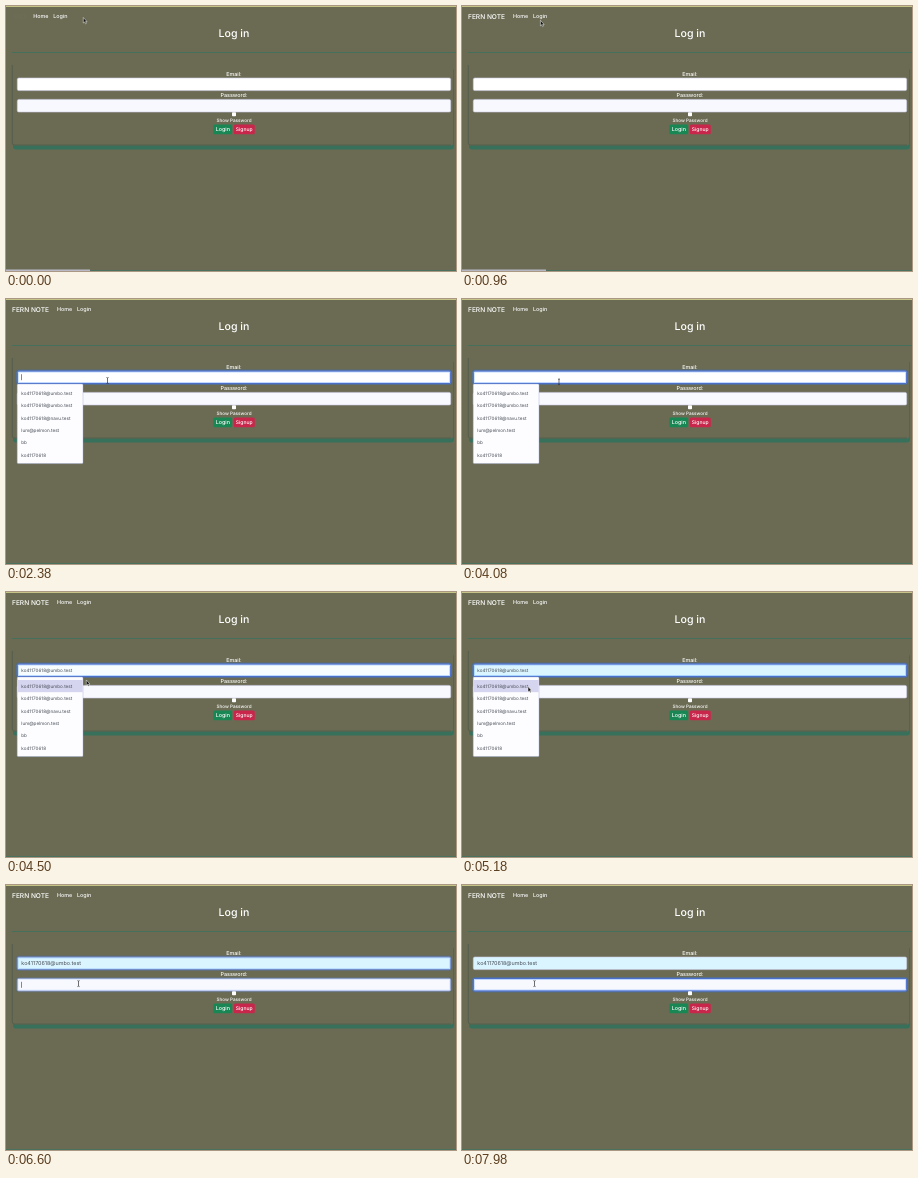
Animation of 450 by 265 pixels, one loop 8000 ms. Source, as an HTML page:

```html
<!DOCTYPE html>
<html lang="en">
<head>
<meta charset="utf-8">
<title>Log in</title>
<style>
  html, body { margin: 0; width: 100%; height: 100%; overflow: hidden; background: #6b6b54; }
  svg { display: block; width: 450px; height: 265px; }
  text { font: 500 5.4px Inter, "Liberation Sans", sans-serif; fill: #fff; text-rendering: geometricPrecision; }
  .mid { text-anchor: middle; }
  .dark { fill: #454b54; font-weight: 400; }
  .field { stroke: #c9cbe2; stroke-width: .6; }
  .ring { fill: none; }
  #menu text { font-size: 4.6px; }
</style>
</head>
<body>
<svg viewBox="0 0 450 265">
  <rect width="450" height="265" fill="#6b6b54"/>
  <rect width="450" height="1" fill="#c6c587"/>
  <rect y="264" width="450" height="1" fill="#4a705e"/>
  <rect id="status" y="263.5" width="84" height="1.5" fill="#b9b9c9"/>

  <text id="brand" x="6" y="12.7" style="font-size:6.6px">FERN NOTE</text>
  <g id="links"><text x="51" y="12.4">Home</text><text x="71" y="12.4">Login</text></g>
  <text class="mid" x="228" y="30.8" style="font-size:10.6px">Log in</text>
  <rect x="6" y="46" width="444" height="1" fill="#47705c"/>

  <rect x="7" y="62" width="441" height="81.5" rx="3" fill="#37705b"/>
  <rect x="6" y="59" width="441" height="80.5" rx="2" fill="#6b6b54"/>
  <path d="M6.3 59V137q0 2 2 2H445" fill="none" stroke="#4d5a48" stroke-width=".7"/>

  <text class="mid" x="228" y="69.6">Email:</text>
  <rect id="email" class="field" x="11.3" y="72" width="433.4" height="12.6" rx="1.5"/>
  <text id="value" class="dark" x="15.3" y="80.4"></text>
  <text class="mid" x="228" y="90.8">Password:</text>
  <rect class="field" x="11.3" y="93.4" width="433.4" height="12.6" rx="1.5" fill="#f8f9ff"/>
  <g id="emailRing"></g>
  <g id="passRing" transform="translate(0 21.4)"></g>
  <rect id="caret" x="15" width=".7" height="6" fill="#555"/>

  <rect x="226" y="106.2" width="4" height="4" rx=".8" fill="#fff"/>
  <text class="mid" x="228" y="116" style="font-size:4.6px">Show Password</text>
  <rect x="207.3" y="118.4" width="18.8" height="9.8" rx="1.5" fill="#198754"/>
  <text class="mid" x="216.8" y="125.2">Login</text>
  <rect x="227.8" y="118.4" width="21" height="9.8" rx="1.5" fill="#c9264b"/>
  <text class="mid" x="238.2" y="125.1" style="font-size:5px">Signup</text>

  <g id="menu">
    <rect x="11.2" y="85" width="65.8" height="79.6" rx="1" fill="#fdfdff" stroke="#9aa8cf" stroke-width=".4"/>
    <rect id="hover" x="11.5" y="88" width="65.2" height="12.2" fill="#d6d5f0"/>
  </g>

  <g id="cursor">
    <path id="arrow" d="M0 -2.5V3L1.3 1.9L2.2 3.8L3.1 3.3L2.2 1.6H3.7Z" fill="#111" stroke="#fff" stroke-width=".5"/>
    <path id="beam" d="M-1 -3Q0 -3 0 -2V2Q0 3 -1 3M1 -3Q0 -3 0 -2M0 2Q0 3 1 3" fill="none" stroke="#333" stroke-width=".7"/>
  </g>
</svg>
<script>
const LOOP = 8000;
const address = "ko41170618@umbo.test";
const suggestions = [address, address, "ko41170618@navu.test", "lum@pelmon.test", "bb", "ko41170618"];
// time, x, y
const path = [[0, 77.3, 14], [860, 77.3, 14], [1660, 102.8, 79], [1720, 102.8, 79], [2380, 101.5, 81.5],
  [3200, 101.5, 81.5], [3340, 97, 82.8], [4080, 97, 82.8], [4880, 66, 97], [5720, 66, 97], [6160, 72.5, 98.6]];

const el = id => document.getElementById(id);
const ramp = (t, from, to) => Math.min(1, Math.max(0, (t - from) / (to - from)));
const smooth = p => p * p * (3 - 2 * p);
const easeOut = p => 1 - (1 - p) ** 3;
const show = (id, opacity) => el(id).setAttribute("opacity", Number(opacity));

for (const id of ["emailRing", "passRing"])
  el(id).innerHTML = [["#0d6efd", 3, .25], ["#4468c8", 1, 1]].map(([color, width, alpha]) =>
    `<rect class="ring" x="11.3" y="72" width="433.4" height="12.6" rx="1.5" stroke="${color}" stroke-width="${width}" stroke-opacity="${alpha}"/>`).join("");

el("menu").insertAdjacentHTML("beforeend", suggestions.map((s, i) =>
  `<text class="dark" x="15.3" y="${95.7 + i * 12.4}">${s}</text>`).join(""));

function pointer(t) {
  let i = path.length - 1;
  while (path[i][0] > t) i--;
  const [t0, x0, y0] = path[i];
  const [t1, x1, y1] = path[i + 1] || [LOOP, x0, y0];
  const p = smooth(ramp(t, t0, t1));
  return [x0 + (x1 - x0) * p, y0 + (y1 - y0) * p];
}

function draw(t) {
  const expand = easeOut(ramp(t, 0, 450));
  el("brand").style.letterSpacing = `${-2.67 * (1 - expand)}px`;
  show("brand", expand);
  el("links").setAttribute("transform", `translate(${-24 * (1 - expand)} 0)`);
  show("status", 1 - ramp(t, 950, 1250));

  const menuOpen = t >= 2020 && t < 5400;
  const previewed = t >= 4500;
  show("menu", menuOpen);
  show("hover", previewed);
  el("value").textContent = previewed ? address : "";
  el("value").style.fontSize = menuOpen ? "4.6px" : "5.4px";
  const fill = ramp(t, 4450, 4700);
  el("email").setAttribute("fill", `rgb(${255 - 37 * fill},${255 - 10 * fill},255)`);

  const toPassword = smooth(ramp(t, 6300, 7000));
  show("emailRing", smooth(ramp(t, 1680, 2380)) * (1 - toPassword));
  show("passRing", toPassword);
  const inPassword = t >= 6300;
  el("caret").setAttribute("y", inPassword ? 96.8 : 75.2);
  show("caret", inPassword ? (t - 6300) % 1000 < 500 : t >= 1720 && t < 2500);

  const [x, y] = pointer(t);
  const overEmail = y > 72 && y < 85;
  const overPassword = y > 93 && y < 106 && !menuOpen;
  el("cursor").setAttribute("transform", `translate(${x} ${y})`);
  show("beam", overEmail || overPassword);
  show("arrow", !(overEmail || overPassword));
}

const start = performance.now();
function tick() {
  draw((performance.now() - start) % LOOP);
  requestAnimationFrame(tick);
}
tick();
</script>
</body>
</html>
```
